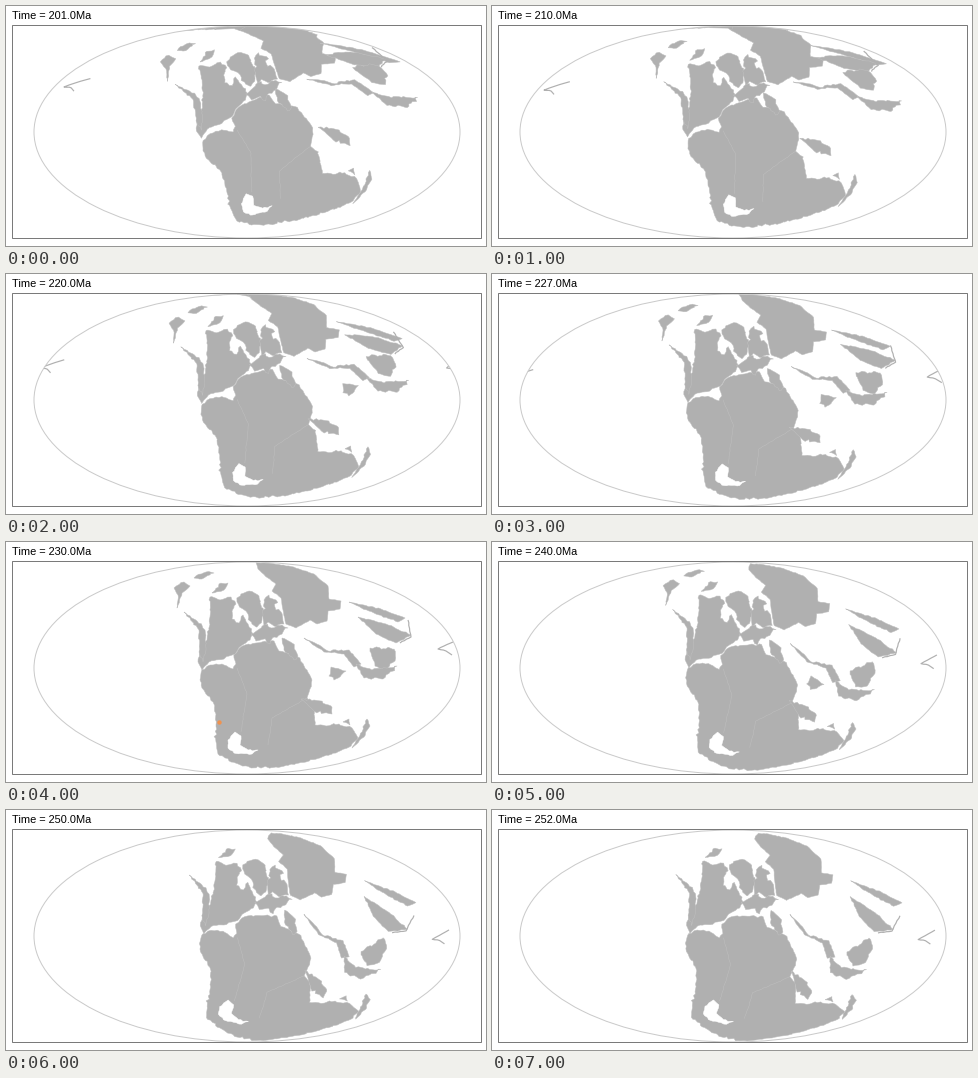
A matplotlib script for the animation above (8000 ms loop, 480 by 240 pixels).

```python
import numpy as np
import matplotlib.pyplot as plt
from matplotlib.animation import FuncAnimation
from matplotlib.patches import Ellipse, PathPatch, Rectangle
from matplotlib.path import Path

W, H, DPI = 480, 240, 100
PX = 72 / DPI
CX, CY, RX, RY = 241, 126, 213, 106
STEPS = [201, 210, 220, 227, 230, 240, 250, 252]
FIRST, BASE, LAST = 201, 230, 252
LAND, SEAM = "#b0b0b0", "#bfbfbf"
rng = np.random.default_rng(7)

fig = plt.figure(figsize=(W / DPI, H / DPI), dpi=DPI, facecolor="white")
ax = fig.add_axes([0, 0, 1, 1])
ax.set(xlim=(0, W), ylim=(H, 0))
ax.axis("off")
globe = Ellipse((CX, CY), 2 * RX, 2 * RY, fill=False, ec="#cacaca", lw=PX, zorder=5)
ax.add_patch(globe)
ax.add_patch(Rectangle((6.1, 19.1), 469, 213, fill=False, ec="#6c6c6c",
                       lw=PX * 0.9, zorder=6))
title = ax.text(6, 13, "", family="Liberation Sans", size=11 * PX, color="black")
parts = []


def to_sphere(pts):
    """Inverse Mollweide projection: stage pixels to unit vectors."""
    x, y = np.array(pts, float).T
    th = np.arcsin(np.clip((CY - y) / RY, -0.9999, 0.9999))
    lat = np.arcsin((2 * th + np.sin(2 * th)) / np.pi)
    lon = np.pi * (x - CX) / (RX * np.cos(th))
    return np.c_[np.cos(lat) * np.cos(lon), np.cos(lat) * np.sin(lon), np.sin(lat)]


def to_map(lon, lat):
    """Mollweide projection, solved for its auxiliary angle by Newton steps."""
    goal = np.pi * np.sin(lat)
    th = lat * 0.9
    for _ in range(12):
        th = th - (2 * th + np.sin(2 * th) - goal) / (2 + 2 * np.cos(2 * th) + 1e-9)
    th = np.clip(th, -np.pi / 2, np.pi / 2)
    return np.c_[CX + RX * lon / np.pi * np.cos(th), CY - RY * np.sin(th)]


def spin(anchors, goals):
    """Best rotation between two sets of anchors, as axis and angle."""
    u, _, vt = np.linalg.svd(to_sphere(anchors).T @ to_sphere(goals))
    fix = np.diag([1, 1, np.linalg.det(vt.T @ u.T)])
    r = vt.T @ fix @ u.T
    axis = np.array([r[2, 1] - r[1, 2], r[0, 2] - r[2, 0], r[1, 0] - r[0, 1]])
    return axis / (np.linalg.norm(axis) + 1e-12), np.arccos(np.clip((np.trace(r) - 1) / 2, -1, 1))


def rotate(v, axis, angle):
    return (v * np.cos(angle) + np.cross(axis, v) * np.sin(angle)
            + np.outer(v @ axis, axis) * (1 - np.cos(angle)))


def drift(before, base, after, ease=False):
    """Motion of a plate away from its place at the base age."""
    back, ahead = spin(base, before), spin(base, after)

    def move(v, age):
        s = (BASE - age) / (BASE - FIRST) if age < BASE else (age - BASE) / (LAST - BASE)
        axis, angle = back if age < BASE else ahead
        return rotate(v, axis, angle * (np.sin(s * np.pi / 2) if ease else s))
    return move


def coast(pts, closed, amp):
    """Subdivide an outline and roughen it with seeded bumps."""
    pts = np.array(pts, float)
    out = []
    for a, b in zip(pts, np.roll(pts, -1, axis=0) if closed else pts[1:]):
        n = max(1, int(np.hypot(*(b - a)) // 2.5))
        out += [a + (b - a) * k / n + (rng.normal(0, amp, 2) if k else 0) for k in range(n)]
    return np.array(out + [pts[0] if closed else pts[-1]])


def outline(v, closed):
    """Project a shape, with copies on both sides of the map's edge."""
    lon = np.unwrap(np.arctan2(v[:, 1], v[:, 0]))
    lat = np.arcsin(np.clip(v[:, 2], -1, 1))
    if closed and abs(lon[-1] - lon[0]) > np.pi:  # the shape holds a pole
        pole = np.sign(lat.mean()) * np.pi / 2
        lon, lat = np.r_[lon, lon[-1], lon[0]], np.r_[lat, pole, pole]
    turns = np.round(lon.mean() / (2 * np.pi)) + np.array([-1, 0, 1])
    return Path.make_compound_path(
        *[Path(to_map(lon - 2 * np.pi * k, lat)) for k in turns])


def add(move, pts, color=LAND, closed=True, width=0.5, bumps=0.6, ages=(FIRST, LAST)):
    v = to_sphere(coast(pts, closed, bumps))
    patch = PathPatch(outline(v, closed), fill=closed, fc=color, joinstyle="round",
                      ec=SEAM if closed and color == LAND else color, lw=width * PX)
    ax.add_patch(patch)
    patch.set_clip_path(globe)
    parts.append((patch, move, v, closed, ages))


def line(move, pts, color=LAND, width=1.2, **kw):
    add(move, pts, color, closed=False, width=width, bumps=0.2, **kw)


# plate motions: anchor points at the first, base and last age
south = drift([(198, 138), (233, 208), (308, 132), (350, 182)],
              [(195, 135), (213, 205), (306, 140), (348, 197)],
              [(195, 130), (205, 203), (303, 152), (347, 204)])
north = drift([(191, 59), (199, 126), (256, 93), (314, 46)],
              [(204, 55), (197, 122), (262, 99), (322, 55)],
              [(209, 51), (197, 121), (268, 101), (332, 63)])
anatolia = drift([(274, 86), (283, 103)], [(280, 98), (290, 117)], [(283, 105), (288, 123)])
tibet = drift([(315, 122), (343, 134)], [(298, 158), (325, 167)], [(303, 166), (316, 182)])
chain = drift([(297, 74), (374, 92)], [(302, 98), (352, 123)], [(306, 112), (336, 143)], True)
amur = drift([(330, 40), (380, 52)], [(350, 63), (395, 76)], [(366, 75), (405, 92)], True)
coastal = drift([(325, 50), (378, 57)], [(358, 78), (398, 96)], [(365, 93), (391, 118)], True)
cathay = drift([(358, 64), (376, 74)], [(370, 108), (382, 126)], [(360, 140), (376, 150)], True)
yangtze = drift([(380, 92), (402, 95)], [(356, 128), (385, 130)], [(342, 155), (364, 164)], True)
arc = drift([(76, 75), (64, 79)], [(445, 101), (433, 107)], [(440, 122), (428, 129)], True)

# southern continents with the inland sea and faint sutures
add(south, [(194, 138), (196, 128), (204, 123), (216, 122), (227, 127), (230, 122),
            (228, 116), (232, 108), (239, 103), (250, 101), (268, 99), (273, 109),
            (292, 115), (301, 128), (306, 138), (304, 147), (301, 156), (308, 162),
            (309, 183), (320, 184), (333, 182), (346, 186), (352, 196), (345, 204),
            (330, 211), (300, 220), (270, 225), (245, 226), (225, 220), (212, 212),
            (210, 200), (210, 172), (207, 160), (200, 152), (196, 146)])
add(south, [(222, 198), (229, 190), (235, 194), (234, 203), (242, 208), (252, 208),
            (246, 212), (228, 211), (222, 206)], "white")
line(south, [(231, 126), (241, 152), (235, 190)], SEAM, 0.5)
line(south, [(301, 156), (266, 176), (262, 203)], SEAM, 0.5)
add(south, [(361, 177), (364, 184), (358, 195), (346, 206), (356, 190)])
add(south, [(337, 180), (343, 177), (344, 183)])

# northern continents
add(north, [(204, 55), (214, 58), (225, 55), (230, 62), (226, 69), (226, 77), (233, 81),
            (237, 73), (242, 82), (247, 92), (244, 98), (235, 104), (229, 112),
            (218, 117), (203, 120), (196, 128), (192, 120), (194, 108), (201, 98), (204, 75)])
add(north, [(178, 70), (191, 79), (199, 88), (200, 108), (197, 120), (193, 110), (193, 88)])
add(north, [(231, 60), (235, 52), (243, 49), (253, 54), (257, 66), (256, 78), (251, 85),
            (246, 82), (242, 72), (237, 67)], bumps=0.9)
add(north, [(258, 58), (263, 53), (270, 58), (270, 68), (275, 70), (278, 82), (268, 84),
            (262, 80), (258, 84), (257, 72)], bumps=0.9)
add(north, [(245, 92), (252, 88), (258, 83), (265, 86), (276, 83), (282, 86), (276, 92),
            (268, 95), (264, 102), (258, 97), (250, 99)], bumps=0.9)
add(north, [(252, 27), (262, 36), (270, 42), (266, 49), (275, 56), (277, 68), (280, 82),
            (290, 86), (304, 78), (311, 82), (321, 79), (322, 69), (334, 67), (335, 59),
            (323, 57), (322, 44), (308, 32), (285, 24.5), (265, 21.3), (250, 20.6)], bumps=0.2)
add(north, [(206, 51), (213, 42), (222, 41), (218, 48)])
add(north, [(168, 46), (178, 40), (184, 44), (176, 51), (171, 66), (172, 53)], ages=(201, 240))
add(north, [(188, 36), (200, 30), (208, 31), (196, 37)], ages=(201, 240))

# blocks of the eastern ocean
add(anatolia, [(276, 96), (286, 101), (292, 114), (288, 118), (278, 108)])
add(tibet, [(295, 157), (308, 158), (325, 164), (326, 172), (308, 169)])
add(chain, [(298, 96), (309, 101), (322, 109), (343, 108), (355, 122), (348, 125),
            (338, 112), (318, 110)], bumps=0.4)
add(amur, [(343, 60), (375, 67), (399, 76), (392, 80), (368, 71)], bumps=0.3)
add(coastal, [(352, 75), (380, 82), (405, 93), (390, 101), (370, 92)], bumps=0.3)
line(coastal, [(402, 78), (405, 95), (394, 101)])
add(cathay, [(364, 106), (388, 107), (389, 119), (380, 128), (369, 124)])
add(yangtze, [(350, 122), (366, 128), (391, 124), (377, 137), (358, 136)])
add(yangtze, [(325, 125), (340, 129), (328, 138), (323, 134)], ages=(220, 240))
line(arc, [(447, 100), (438, 104), (432, 107), (440, 109), (446, 113)])

find, = ax.plot([213], [179.5], "o", ms=4.4 * PX, color="#f0924e", mew=0, zorder=7)


def draw(i):
    age = STEPS[i]
    title.set_text(f"Time = {age:.1f}Ma")
    for patch, move, v, closed, (first, last) in parts:
        patch.set_visible(first <= age <= last)
        patch.set_path(outline(move(v, age), closed))
    find.set_visible(age == BASE)
    return []


anim = FuncAnimation(fig, draw, frames=len(STEPS), interval=1000, repeat=True,
                     repeat_delay=0, blit=False)
plt.show()
```
